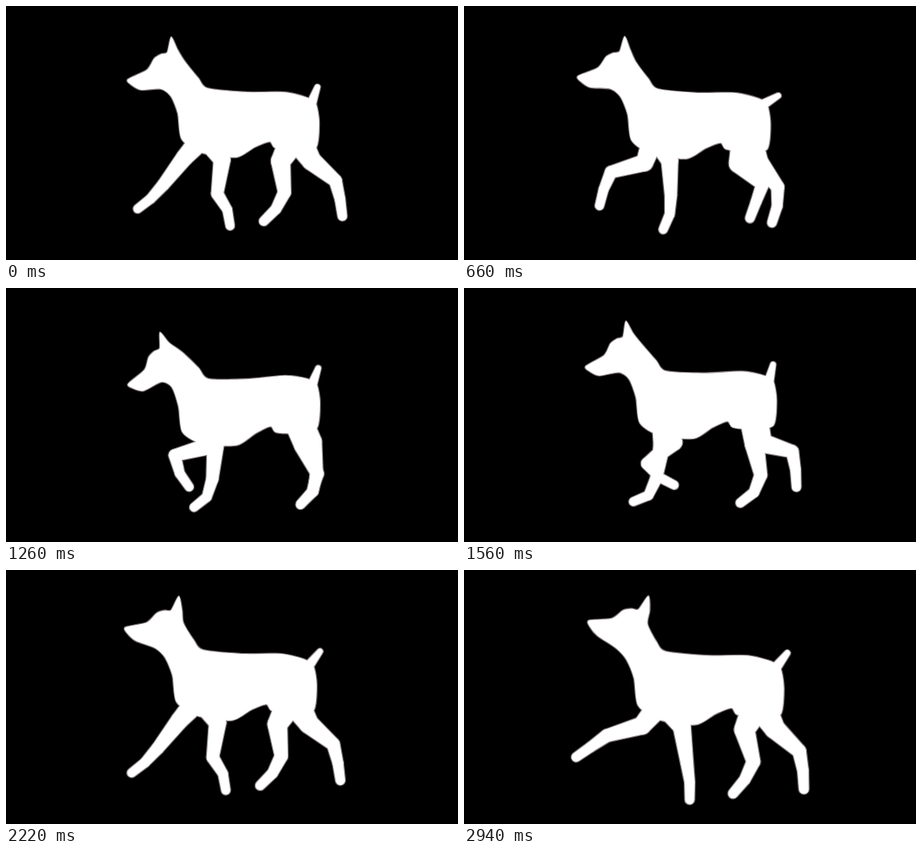
Recreate the animation shown at these times as an HTML page with a canvas. Size 576x324 px, loop 3000 ms.

```html
<!DOCTYPE html>
<html>
<head>
<meta charset="utf-8">
<style>
html, body { margin: 0; width: 100%; height: 100%; overflow: hidden; background: #000; }
canvas { display: block; }
</style>
</head>
<body>
<canvas id="stage" width="576" height="324"></canvas>
<script>
const ctx = document.getElementById('stage').getContext('2d');
const LOOP = 3000, STEP = 60, RAD = Math.PI / 180;

// Slow drift: time, steps walked, x and y of the withers, size, rump lift, head tilt, tail angle.
const drift = [
  [0, 0, 257, 105, 1, 0, -3, 20],
  [420, 1.13, 243, 102, 1, 0, 2, 40],
  [900, 2.38, 251, 104, 1.02, 0, 0, 80],
  [1260, 3.52, 258, 104, 1, -12, -17, 20],
  [1860, 5.03, 256, 100, 0.99, 0, 3, 8],
  [2220, 6, 251, 102, 1.02, 0, 11, 38],
  [2940, 7.95, 257, 104, 1.06, 0, 19, 38]
];

// One leg's cycle of two steps: moment, then each bone's angle, forward of straight down.
const front = {
  hip: [-4, 60], bones: [38, 44, 24, 21], radii: [14, 10.5, 7.5, 6, 5.5],
  cycle: [
    [0, 42, 38, 42, 52], [0.13, 20, 10, 25, 70], [0.4, -15, 9, 24, 65], [0.95, -38, -8, -8, 0],
    [1, -36, 8, -32, -10], [1.13, -28, 24, -50, -65], [1.4, -18, 75, -35, -60], [1.95, 40, 74, 55, 55]
  ]
};
const hind = {
  hip: [112, 60], bones: [38, 40, 24, 22], radii: [18, 12, 8, 6.5, 5.8],
  cycle: [
    [0, 30, -7, 27, 45], [0.13, 5, -3, 22, 55], [0.45, -12, -22, 21, 49], [1, -32, -50, -14, -8],
    [1.13, -12, -80, -5, 0], [1.38, -22, -70, -14, -5], [1.52, -32, -8, 10, 45], [1.75, 15, -50, 20, 20]
  ]
};

// Outline points relative to the withers.
const head = [
  [-47, 10], [-60, 0], [-85, -1], [-97, -8], [-101, -15], [-76, -26], [-66, -40], [-57, -45],
  [-49, -47], [-43, -66], [-36, -50], [-28, -34], [-12, -13]
];
const torso = [
  [0, 0], [50, 5], [98, 5], [127, 12], [138, 20], [142, 44], [138, 76], [112, 80],
  [86, 76], [79, 68], [60, 75], [36, 88], [-8, 82], [-33, 65], [-38, 32]
];

const clamp = (v, lo, hi) => Math.max(lo, Math.min(hi, v));

// Blend rows whose first column is their moment.
function sample(rows, at) {
  const last = rows.length - 2;
  const i = clamp(rows.findIndex(r => r[0] > at) - 1, 0, last);
  const a = rows[at >= rows[last + 1][0] ? last : i];
  const b = rows[rows.indexOf(a) + 1];
  const k = clamp((at - a[0]) / (b[0] - a[0]), 0, 1);
  return a.map((v, n) => v + (b[n] - v) * k);
}

// Closed smooth curve through the points.
function blob(points) {
  const n = points.length, path = new Path2D();
  const at = i => points[(i + n) % n];
  path.moveTo(...at(0));
  for (let i = 0; i < n; i++) {
    const [p, a, b, q] = [at(i - 1), at(i), at(i + 1), at(i + 2)];
    path.bezierCurveTo(a[0] + (b[0] - p[0]) / 8, a[1] + (b[1] - p[1]) / 8,
      b[0] - (q[0] - a[0]) / 8, b[1] - (q[1] - a[1]) / 8, b[0], b[1]);
  }
  path.closePath();
  return path;
}

// Hull of two circles.
function limb(ax, ay, ar, bx, by, br) {
  const turn = Math.atan2(by - ay, bx - ax);
  const open = Math.acos((ar - br) / Math.hypot(bx - ax, by - ay));
  const path = new Path2D();
  path.arc(ax, ay, ar, turn + open, turn - open + 2 * Math.PI);
  path.arc(bx, by, br, turn - open, turn + open);
  path.closePath();
  return path;
}

function leg({ hip, bones, radii, cycle }, moment) {
  const [, ...angles] = sample([...cycle, [2, ...cycle[0].slice(1)]], moment % 2);
  let [x, y] = hip;
  return bones.map((length, i) => {
    const ax = x, ay = y;
    x -= length * Math.sin(angles[i] * RAD);
    y += length * Math.cos(angles[i] * RAD);
    return limb(ax, ay, radii[i], x, y, radii[i + 1]);
  });
}

// The neck bends: the farther from its root, the more of the tilt a point takes.
function bend([x, y], tilt) {
  const dx = x + 30, dist = Math.hypot(dx, y);
  const a = tilt * RAD * clamp((dist - 15) / 35, 0, 1);
  return [-30 + dx * Math.cos(a) - y * Math.sin(a), dx * Math.sin(a) + y * Math.cos(a)];
}

function dog(t) {
  const [, steps, x, y, size, rump, tilt, tail] = sample(drift, t);
  // The body sinks between the legs in the middle of each step.
  const sink = 12 * Math.sin(Math.PI * steps) ** 4;
  const slope = rump / 130;
  const outline = [
    ...head.map(p => bend(p, tilt)),
    ...torso.map(([px, py]) => [px, py + px * slope])
  ].map(([px, py]) => [px, py + sink]);
  const tailY = 20 + rump + sink;

  ctx.setTransform(size, 0, 0, size, x, y);
  return [
    blob(outline),
    limb(132, tailY, 6, 132 + 23 * Math.sin(tail * RAD), tailY - 23 * Math.cos(tail * RAD), 3.5),
    ...[0, 1].flatMap(side => [...leg(front, steps + side), ...leg(hind, steps + side)])
  ];
}

function draw(now) {
  const t = Math.floor((now % LOOP) / STEP) * STEP;
  ctx.resetTransform();
  ctx.fillStyle = '#000';
  ctx.fillRect(0, 0, 576, 324);
  const parts = dog(t);
  ctx.lineJoin = 'round';
  ctx.lineWidth = 2.4;
  ctx.strokeStyle = '#857c7c';
  parts.forEach(p => ctx.stroke(p));
  ctx.fillStyle = '#fff';
  parts.forEach(p => ctx.fill(p));
}

const start = performance.now();
function tick() {
  draw(performance.now() - start);
  requestAnimationFrame(tick);
}
tick();
</script>
</body>
</html>
```
